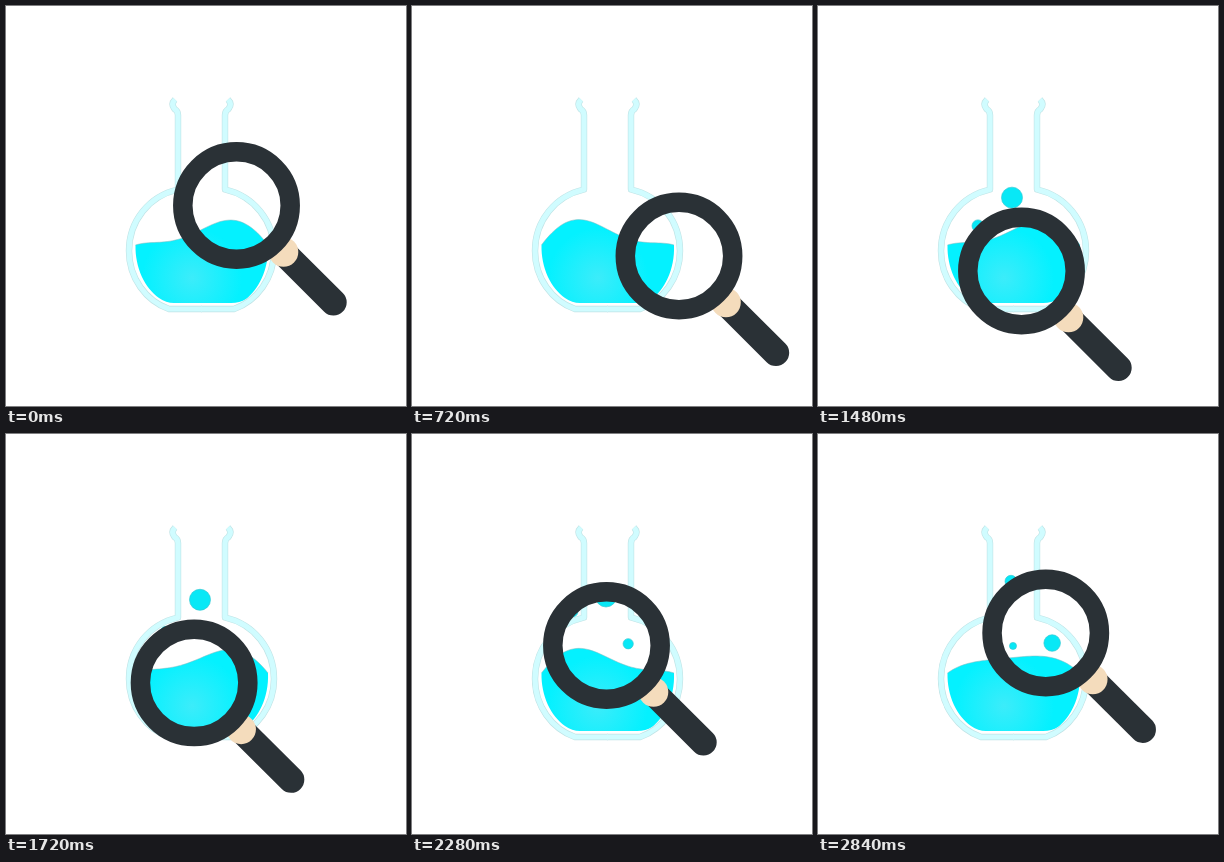
Write an HTML page that moves like this. It is 400 by 400 pixels and loops after 2.88 s.

```html
<!DOCTYPE html>
<html lang="en">
<head>
<meta charset="utf-8">
<title>Flask and magnifier</title>
<style>
  html, body { margin: 0; width: 100%; height: 100%; overflow: hidden; background: #fff; }
  svg { display: block; width: 100vw; height: 100vh; }
</style>
</head>
<body>
<svg viewBox="0 0 400 400">
  <defs>
    <radialGradient id="glow" gradientUnits="userSpaceOnUse" cx="186" cy="272" r="50">
      <stop offset="0" stop-color="#3cecfa"/>
      <stop offset="1" stop-color="#04f1ff"/>
    </radialGradient>
    <g id="glass" fill="none" stroke-linejoin="round">
      <path id="half" d="M169 93.5Q164.500 98 168.500 103Q172 105 172 109V183.500C143 190 123 215 123 245C123 272 140 295 163 303H196"/>
      <use href="#half" transform="matrix(-1 0 0 1 391 0)"/>
    </g>
  </defs>
  <g id="bubbles" fill="#08e8f6" stroke="#35cbd5" stroke-width=".7"></g>
  <path id="liquid" fill="url(#glow)"/>
  <path id="surface" fill="none" stroke="#86b9bd" stroke-width=".8" opacity=".65"/>
  <use href="#glass" stroke="#bfe3e5" stroke-width="6.4"/>
  <use href="#glass" stroke="#d0fcff" stroke-width="5.2"/>
  <g id="lens">
    <path d="M50 50L97 96.800" stroke="#2a3136" stroke-width="26.400" stroke-linecap="round"/>
    <circle cx="47" cy="46.500" r="14.800" fill="#f4dcbc"/>
    <circle r="53.700" fill="none" stroke="#2a3136" stroke-width="19.500"/>
  </g>
</svg>
<script>
const LOOP = 2880, STEP = 40, SWAY = 1640;
const LEFT = 129.5, RIGHT = 262;
const byId = id => document.getElementById(id);

// Key points of the lens path: [time, x, y]
const path = [
  [0, 230.5, 199.5], [560, 275, 233], [720, 267, 250], [1160, 231.5, 273],
  [1480, 203.5, 265], [1680, 189.5, 252], [1960, 185.5, 229], [2280, 194.5, 211.5]
];

// Each bubble rises from the same depth and pops on its way back
const DEPTH = 246, LIFE = 2400, POP = 0.75;
const bubbles = [
  { born: 820, x: 194, height: 94, size: 10.5 },
  { born: 978, x: 160, height: 70, size: 6 },
  { born: 1370, x: 187, height: 42, size: 0, drift: 77, growth: 13.5 },
  { born: 2245, x: 193, height: 200, size: 6 },
  { born: 2250, x: 195, height: 70, size: 3.5 }
];

for (const bubble of bubbles) {
  bubble.el = document.createElementNS("http://www.w3.org/2000/svg", "circle");
  byId("bubbles").append(bubble.el);
}

function key(i) {
  const n = path.length, [time, x, y] = path[(i + n) % n];
  return [time + Math.floor(i / n) * LOOP, x, y];
}

// Closed smooth curve through the key points
function lensAt(t) {
  const i = path.findLastIndex(k => k[0] <= t);
  const [a, b, c, d] = [i - 1, i, i + 1, i + 2].map(key);
  const span = c[0] - b[0], u = (t - b[0]) / span;
  return [1, 2].map(k => {
    const m0 = (c[k] - a[k]) / (c[0] - a[0]) * span;
    const m1 = (d[k] - b[k]) / (d[0] - b[0]) * span;
    const ease = u * u * (3 - 2 * u);
    return b[k] + (c[k] - b[k]) * ease
         + m0 * u * (1 - u) ** 2 - m1 * u * u * (1 - u);
  });
}

// A domed surface with one wave swinging from side to side
function drawLiquid(t) {
  const lean = Math.cos(2 * Math.PI * (t + 80) / SWAY);
  const points = [];
  for (let i = 0; i <= 50; i++) {
    const v = i / 50;
    const dome = 15.5 * Math.abs(2 * v - 1) ** 3.5;
    const wave = 11 * lean * Math.sin(2 * Math.PI * v);
    points.push(`${LEFT + (RIGHT - LEFT) * v} ${223.5 + dome + wave}`);
  }
  const top = "M" + points.join("L");
  byId("surface").setAttribute("d", top);
  byId("liquid").setAttribute("d", top +
    "C263 264 252 284 240 293Q234 297 225 297H168Q160 297 153 292C139 282 129 262 129.5 239Z");
}

function drawBubble({ el, born, x, height, size, drift = 0, growth = 0 }, t) {
  const u = (t - born) / LIFE;
  const shown = u > 0 && u < POP;
  el.style.display = shown ? "" : "none";
  if (!shown) return;
  el.setAttribute("cx", x + drift * u);
  el.setAttribute("cy", DEPTH - height * Math.sin(Math.PI * u) ** 2);
  el.setAttribute("r", size + growth * u);
}

function draw(t) {
  drawLiquid(t);
  for (const bubble of bubbles) drawBubble(bubble, t);
  byId("lens").setAttribute("transform", `translate(${lensAt(t)})`);
}

const start = performance.now();
function tick() {
  const t = (performance.now() - start) % LOOP;
  draw(Math.floor(t / STEP) * STEP);
  requestAnimationFrame(tick);
}
tick();
</script>
</body>
</html>
```
